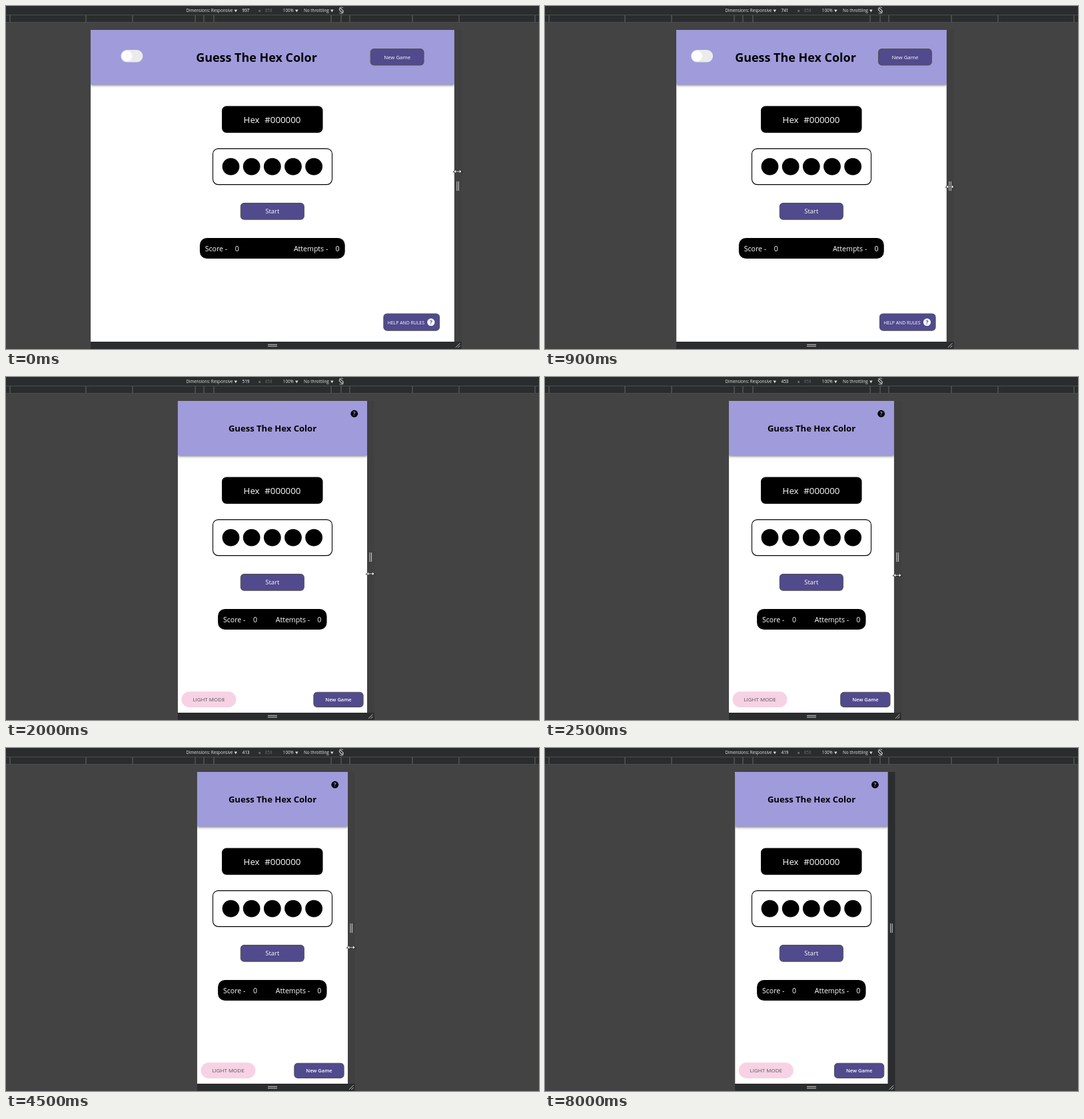
Animation of 800 by 516 pixels, one loop 8200 ms. Source, as an HTML page with a canvas:

```html
<!DOCTYPE html>
<html lang="en">
<head>
<meta charset="utf-8">
<title>Guess The Hex Color</title>
<style>
html, body { margin: 0; width: 100%; height: 100%; overflow: hidden; background: #434343; }
canvas { display: block; width: 800px; height: 516px; }
</style>
</head>
<body>
<canvas id="stage"></canvas>
<script>
const W = 800, H = 516, LOOP = 8200, STEP = 100;
const ZOOM = 0.5475, MID = 400, BREAKPOINT = 600;
const FONT = '"Open Sans", "Noto Sans", sans-serif';
const DARK = '#2a2c2d', PURPLE = '#514a8d', HEADER = '#a09bdb', LINE = '#4b4d4f';

const canvas = document.getElementById('stage');
const ctx = canvas.getContext('2d');
const dpr = window.devicePixelRatio || 1;
canvas.width = W * dpr;
canvas.height = H * dpr;

// [time, viewport width] while the edge is dragged
const widths = [
  [0, 997], [900, 741], [1800, 538], [1900, 538], [2000, 519], [2400, 463],
  [2800, 422], [3200, 411], [4400, 411], [4500, 413], [4600, 414],
  [5300, 414], [5400, 416], [5600, 419]
];
const cursorY = [[0, 249], [900, 272], [2000, 296], [2900, 300]];
const stripShade = [[7400, 0], [7700, 1]];

function track(keys, t) {
  if (t <= keys[0][0]) return keys[0][1];
  for (let i = 1; i < keys.length; i++) {
    const [t0, a] = keys[i - 1], [t1, b] = keys[i];
    if (t <= t1) return a + (b - a) * (t - t0) / (t1 - t0);
  }
  return keys[keys.length - 1][1];
}

function rect(x, y, w, h, color) {
  ctx.fillStyle = color;
  ctx.fillRect(x, y, w, h);
}

function box(x, y, w, h, r, fill, stroke) {
  ctx.beginPath();
  ctx.roundRect(x, y, w, h, r);
  if (fill) { ctx.fillStyle = fill; ctx.fill(); }
  if (stroke) { ctx.strokeStyle = stroke; ctx.lineWidth = 1.1; ctx.stroke(); }
}

function disc(x, y, r, color) {
  ctx.beginPath();
  ctx.arc(x, y, r, 0, Math.PI * 2);
  ctx.fillStyle = color;
  ctx.fill();
}

function path(points, color, width) {
  ctx.beginPath();
  points.forEach(([x, y], i) => i ? ctx.lineTo(x, y) : ctx.moveTo(x, y));
  ctx.strokeStyle = color;
  ctx.lineWidth = width;
  ctx.stroke();
}

function text(str, x, y, size, color, weight = 400, align = 'left') {
  ctx.font = `${weight} ${size}px ${FONT}`;
  ctx.textAlign = align;
  ctx.fillStyle = color;
  ctx.fillText(str, x, y);
}

function button(x, y, w, h, label, size, weight) {
  box(x + .6, y + .6, w - 1.2, h - 1.2, 5, PURPLE, '#515058');
  text(label, x + w / 2, y + h / 2 + size * .36, size, '#fff', weight, 'center');
}

function caret(x) {
  ctx.beginPath();
  ctx.moveTo(x, 5.4);
  ctx.lineTo(x + 4.6, 5.4);
  ctx.lineTo(x + 2.3, 9.2);
  ctx.fillStyle = '#dcdcdc';
  ctx.fill();
}

function rotateIcon(x, y) {
  ctx.save();
  ctx.translate(x, y);
  ctx.rotate(-Math.PI / 4);
  box(-1.5, -3.2, 3, 6.4, .6, null, '#d0d0d0');
  ctx.restore();
  for (const a of [-.5, .5]) {
    ctx.beginPath();
    ctx.arc(x, y, 4.8, (a - .25) * Math.PI, (a + .2) * Math.PI);
    ctx.strokeStyle = '#d0d0d0';
    ctx.lineWidth = .8;
    ctx.stroke();
  }
}

function toolbar(width) {
  rect(0, 0, W, 25, DARK);
  rect(0, 13, W, 1, LINE);
  rect(0, 24, W, 1, LINE);
  for (const preset of [320, 375, 425, 768, 1024, 1440]) {
    const half = preset * ZOOM / 2;
    for (const x of [MID - half, MID + half]) rect(Math.round(x) - .5, 14, 1, 10, '#66696b');
  }
  const ink = '#e6e6e6';
  text('Dimensions: Responsive', 270.5, 9.3, 6.2, ink);
  caret(342.5);
  text(Math.round(width), 360, 9.3, 6.5, '#fff', 400, 'center');
  text('×', 378.5, 9.8, 7.5, '#b0b0b0');
  text('858', 388.8, 9.3, 6.2, '#6c6c6c');
  text('100%', 415.8, 9.3, 6.3, ink);
  caret(434);
  text('No throttling', 447, 9.3, 6.35, ink);
  caret(487);
  rotateIcon(503.3, 6.6);
}

function header(left, width, small) {
  ctx.save();
  ctx.beginPath();
  ctx.rect(left, 36, width, 100);
  ctx.clip();
  ctx.shadowColor = 'rgba(0,0,0,.6)';
  ctx.shadowBlur = 4 * dpr;
  ctx.shadowOffsetY = 1.2 * dpr;
  rect(left, 36, width, 82, HEADER);
  ctx.restore();

  const right = left + width;
  if (small) {
    text('Guess The Hex Color', MID, 82.4, 13.07, '#000', 700, 'center');
    disc(right - 19.3, 55.2, 5.4, '#000');
    text('?', right - 19.3, 58.1, 8, HEADER, 700, 'center');
    return;
  }
  text('Guess The Hex Color', 376, 84.1, 17.95, '#000', 700, 'center');
  const edge = 5.5 + (width - 307) / 6;
  const toggle = left + edge;
  box(toggle, 66, 33, 18.6, 9.3, '#ebebeb');
  disc(toggle + 9.2, 75.3, 7.8, '#fff');
  button(right - edge - 81, 64, 81, 25.5, 'New Game', 7.8);
}

function board(small) {
  box(324, 150.5, 151.5, 40.2, 7, '#000');
  text('Hex', 356.6, 176.4, 13.3, '#fff');
  text('#000000', 388.2, 176.4, 13.3, '#fff');

  box(310.5, 214.6, 179, 54, 8, null, '#000');
  for (let i = -2; i <= 2; i++) disc(399.8 + i * 31.15, 241.6, 12.9, '#000');

  button(351.7, 296, 96.2, 25.7, 'Start', 9.45);

  const half = small ? 81.7 : 108.9;
  const a = 399.8 - half, b = 399.8 + half;
  box(a, 349, half * 2, 31, 10.5, '#000');
  text('Score -', a + 7.8, 369, 10.6, '#fff');
  text('0', a + 52.9, 369, 10.6, '#fff');
  text('Attempts -', b - 76.8, 369, 10.6, '#fff');
  text('0', b - 14.3, 369, 10.6, '#fff');
}

function footer(left, width, small) {
  const right = left + width;
  if (small) {
    box(left + 5.5, 473.2, 82, 23.8, 11.9, '#f7d2e4');
    text('LIGHT MODE', left + 46.5, 488.2, 8, '#555', 400, 'center');
    button(right - 80.8, 473.7, 75.4, 23.3, 'New Game', 7.5, 600);
    return;
  }
  const x = right - width * .04 - 84.8;
  box(x + .6, 463, 83.6, 25.2, 5, PURPLE, '#515058');
  text('HELP AND RULES', x + 6.4, 478.7, 6.9, '#fff');
  disc(x + 71.6, 475.7, 5.6, '#fff');
  text('?', x + 71.6, 478.8, 8.2, PURPLE, 700, 'center');
}

function resizers(left, right, shade) {
  const tone = (a, b) => Math.round(a + (b - a) * shade);
  rect(right, 36, 10.7, 469, `rgb(${tone(64, 42)},${tone(64, 44)},${tone(65, 45)})`);
  rect(left, 505, right - left + 10.7, 11, DARK);
  const grip = '#c4c4c4';
  for (const d of [3.5, 6]) {
    rect(right + d - .1, 264, 1.1, 14, grip);
    rect(393, 505 + d + .3, 14, 1.1, grip);
  }
  path([[right + 2, 513.8], [right + 8.5, 507.3]], grip, 1);
  path([[right + 5.5, 513.8], [right + 8.5, 510.8]], grip, 1);
}

function cursor(x, y) {
  const arrows = [1, -1].map(s => [
    [x, y], [x + s * 4.6, y], [x + s * 2.9, y - 1.6], [x + s * 4.6, y], [x + s * 2.9, y + 1.6]
  ]);
  arrows.forEach(p => path(p, '#111', 2.4));
  arrows.forEach(p => path(p, '#fff', 1.1));
}

function draw(t) {
  ctx.setTransform(dpr, 0, 0, dpr, 0, 0);
  const viewport = track(widths, t);
  const width = viewport * ZOOM;
  const left = MID - width / 2, right = MID + width / 2;
  const small = viewport <= BREAKPOINT;

  rect(0, 0, W, H, '#434343');
  toolbar(viewport);
  rect(left, 36, width, 469, '#fff');
  header(left, width, small);
  board(small);
  footer(left, width, small);
  resizers(left, right, track(stripShade, t));
  if (t < 6900) cursor(right + 5, track(cursorY, t));
}

const start = performance.now();
function frame() {
  const t = (performance.now() - start) % LOOP;
  draw(Math.floor(t / STEP) * STEP);
  requestAnimationFrame(frame);
}
frame();
</script>
</body>
</html>
```
